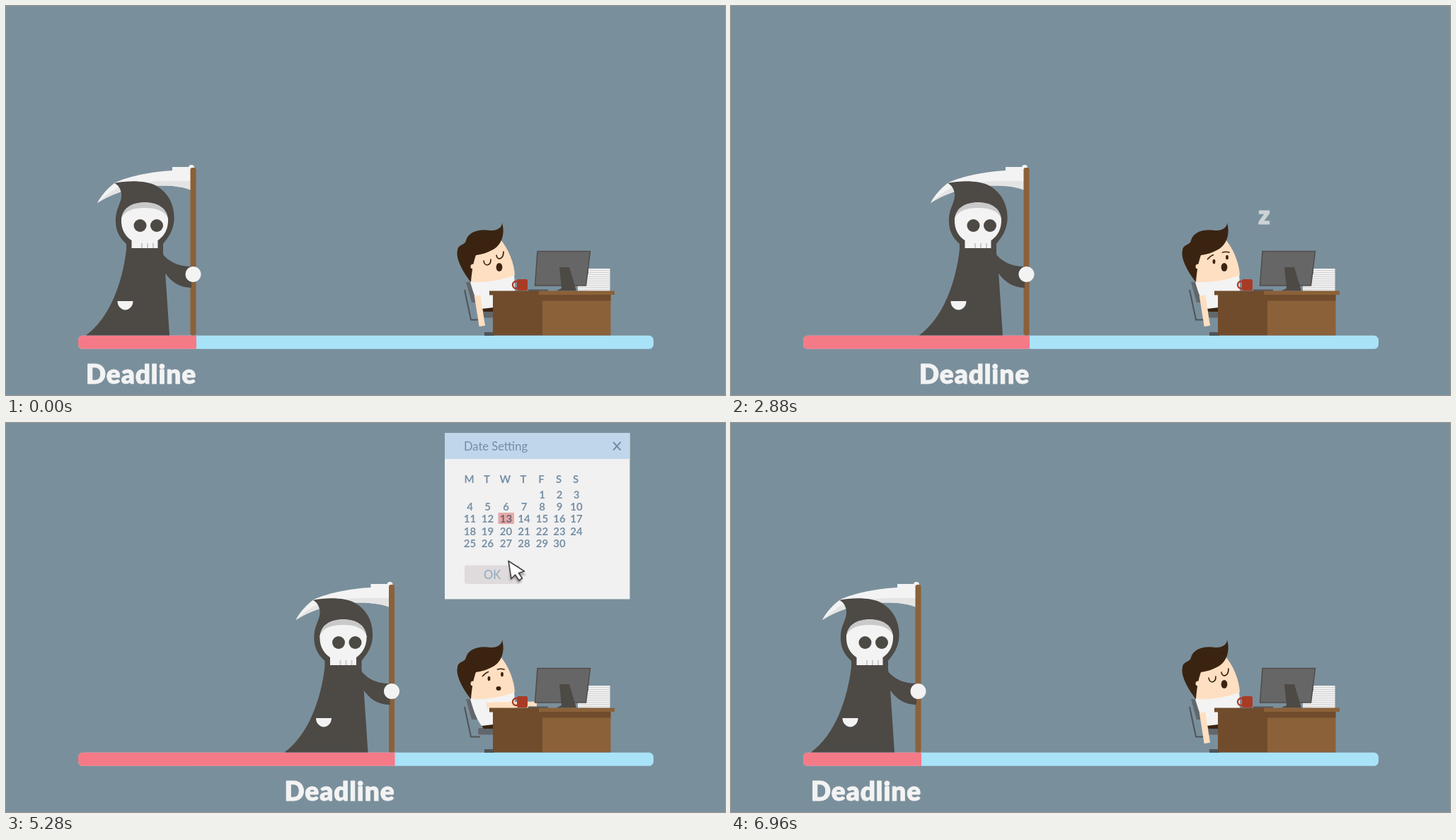
Animation of 1016x551 px, one loop 7 s. Source, as an HTML page:

```html
<!DOCTYPE html>
<html lang="en">
<head>
<meta charset="utf-8">
<title>Deadline</title>
<style>
html, body { margin: 0; width: 100%; height: 100%; overflow: hidden; background: #7a8f9c; }
svg { display: block; width: 100%; height: 100%; }
text { font-family: Lato, sans-serif; text-anchor: middle; }
.dark { fill: #4d4945; }
.bone { fill: #f3f3f3; }
.wood { fill: #8b6139; }
.walnut { fill: #704c2d; }
.skin { fill: #ffdfc1; }
.hair { fill: #3a2411; }
.steel { fill: #62676b; }
.line { fill: none; stroke: #3a2411; stroke-width: 1.7; stroke-linecap: round; }
.title { font-size: 37px; font-weight: 900; letter-spacing: .9px; fill: #f3f3f3; stroke: #f3f3f3; stroke-width: .8; stroke-linejoin: round; }
.z { font-weight: 900; fill: #f3f3f3; stroke: #f3f3f3; stroke-width: 1; stroke-linejoin: round; }
.days { font-size: 15px; font-weight: 700; fill: #7890a4; }
</style>
</head>
<body>
<svg viewBox="0 0 1016 551">
  <defs>
    <clipPath id="track"><rect x="102" y="466.8" width="813" height="19" rx="6.5"/></clipPath>
    <filter id="soft" x="-50%" y="-50%" width="200%" height="200%"><feGaussianBlur stdDeviation="1.6"/></filter>
  </defs>
  <rect width="1016" height="551" fill="#7a8f9c"/>

  <g clip-path="url(#track)">
    <rect x="102" y="466" width="813" height="21" fill="#a8e3f8"/>
    <rect id="fill" x="102" y="466" width="167" height="21" fill="#f57a87"/>
  </g>

  <g id="reaper">
    <path class="bone" d="M262 228H235V233C200 235 168 243 153 251C143 259 134 269 129 279C150 266 165 262 180 258C212 253 243 253 262 261Z"/>
    <path fill="#e4e4e4" d="M129 279C143 266 153 260 163 255C195 248 230 247 262 248V261C243 253 212 253 180 258C165 262 150 266 129 279Z"/>
    <circle class="bone" cx="262" cy="229" r="4"/>
    <rect class="wood" x="260.5" y="229" width="8" height="237.5" rx="3"/>
    <path class="dark" d="M221 351C230 362 243 369 262 369V399C246 399 233 391 224 377Z"/>
    <path class="dark" d="M153 251C173 247 198 247 213 255C232 266 240 287 237 308C234 324 226 331 222 337V349L225 376L231 466.5H113C147 442 165 390 170 345V337C159 327 154 316 155 300C156 285 164 278 163 266C162 258 158 253 153 251Z"/>
    <path fill="#c9c9c9" d="M163 304C163 287 177 278 196 278S229 287 229 304L196 310Z"/>
    <path class="bone" d="M163 301C168 289 182 286 196 286S224 289 229 301C230 318 221 328 214.500 332V343H177.500V332C170 327 162 318 163 301Z"/>
    <path d="M192 343V336M200 343V336M208 343V336" stroke="#c9c9c9" stroke-width="2"/>
    <circle class="dark" cx="189.500" cy="311" r="9"/>
    <circle class="dark" cx="213" cy="311" r="9"/>
    <path class="bone" d="M157.500 418H179.500A11 12.500 0 0 1 157.500 418Z"/>
    <circle class="bone" cx="264.500" cy="380" r="11"/>
    <text class="title" x="191" y="534.500">Deadline</text>
  </g>

  <g id="worker">
    <path d="M648 402L657 444.500H670" fill="none" stroke="#4f5458" stroke-width="2"/>
    <path class="steel" d="M650 391H657L667 420H658Z"/>
    <rect class="steel" x="667" y="432" width="24" height="9.500" rx="3"/>
    <rect x="676" y="462" width="14" height="5" fill="#4f5458"/>
    <path class="hair" d="M671 427H690V433H675Z"/>
    <path class="bone" d="M656 391C680 391 704 387 718 380C719 390 719 398 719 405H690L689 427L672 429C664 418 660 405 656 391Z"/>
    <path class="skin" d="M657 391C654 375 656 357 660 345L699 331C710 344 718 364 719 381C702 388 680 392 657 391Z"/>
    <path class="hair" d="M638 346C639 337 649 339 650 332C653 320 668 315 685 318C696 318 701 313 701 307C706 325 699 338 690 344C680 350 671 352 664 353C660 364 658 378 657 391C645 376 635 357 638 346Z"/>
    <circle class="skin" cx="660" cy="369" r="3.500"/>
    <g id="asleep" class="line">
      <path d="M675 361C676 369 685 369 685 359M693 353C694 361 703 359 703 348"/>
    </g>
    <g id="awake">
      <ellipse class="hair" cx="682.500" cy="362" rx="1.900" ry="3.300"/>
      <ellipse class="hair" cx="701" cy="356" rx="1.900" ry="3.300"/>
      <path class="line" d="M673.500 358.500Q677 354 681.500 352.500M694.500 349Q699 347.500 704 349"/>
    </g>
    <ellipse id="mouth" class="hair"/>
    <line id="arm" stroke="#ffdfc1" stroke-width="8.500"/>
  </g>

  <g id="desk">
    <g id="papers"></g>
    <rect x="738" y="401.500" width="28" height="2.500" fill="#55585a"/>
    <path d="M751 347.500H825.500L819.500 396H747.500Z" fill="#666" stroke="#504d4b" stroke-width="1.500"/>
    <path class="dark" d="M782 370H796L806 403.500H777L785 400Z"/>
    <ellipse cx="720.500" cy="395" rx="4.500" ry="5" fill="none" stroke="#a93b25" stroke-width="2.400"/>
    <rect x="722" y="387" width="15" height="16" rx="2" fill="#a93b25"/>
    <rect class="walnut" x="688" y="408" width="70" height="58.500"/>
    <rect class="wood" x="758" y="408" width="96.500" height="58.500"/>
    <rect class="walnut" x="758" y="409" width="96.500" height="8.500"/>
    <rect class="walnut" x="683" y="403.500" width="72" height="6"/>
    <rect class="wood" x="753" y="403.500" width="107" height="5.500"/>
  </g>

  <text id="smallZ" class="z" x="735" font-size="19">z</text>
  <text id="bigZ" class="z" x="753.5" font-size="36">z</text>

  <g id="calendar">
    <rect x="620" y="14" width="261.500" height="235.500" fill="#f1f1f2"/>
    <rect x="620" y="14" width="261.500" height="37" fill="#c0d6ea"/>
    <text x="692" y="38.500" font-size="16.500" fill="#748da3">Date Setting</text>
    <path d="M858 27L868.500 38.500M868.500 27L858 38.500" stroke="#748da3" stroke-width="1.900"/>
    <rect id="mark" y="127" width="22.500" height="16" fill="#e5aaa7"/>
    <g id="days" class="days"></g>
    <rect x="648" y="201.500" width="78" height="26.500" rx="3" fill="#dfdadb"/>
    <text x="687" y="221" font-size="16.500" fill="#8fa9be">OK</text>
    <g id="cursor">
      <path d="M2 3V28L9 23L14 31L19 29L15 20H25Z" fill="#000" opacity=".35" filter="url(#soft)"/>
      <path d="M0 0L4 25L9.500 19.500L15 27.500L19.500 24.500L14.500 17L22.500 14.500Z" fill="#fff" stroke="#464646" stroke-width="1.700" stroke-linejoin="round"/>
    </g>
  </g>
</svg>
<script>
const LOOP = 7000, STEP = 40, SPEED = 53.12;
const RETURN_START = 6000, RETURN_END = 6960;
const el = Object.fromEntries([...document.querySelectorAll('[id]')].map(node => [node.id, node]));
const set = (node, attrs) => Object.entries(attrs).forEach(([key, value]) => node.setAttribute(key, value));
const add = (parent, tag, attrs, text = '') => {
  const node = document.createElementNS('http://www.w3.org/2000/svg', tag);
  set(node, attrs);
  node.textContent = text;
  parent.append(node);
  return node;
};
const clamp = v => Math.min(1, Math.max(0, v));
const smooth = p => p * p * (3 - 2 * p);
const mix = (a, b, p) => a + (b - a) * p;

// Eased value of a table of [time, ...values] rows
function track(rows, t) {
  const next = rows.findIndex(row => row[0] > t);
  if (next === 0) return rows[0].slice(1);
  if (next < 0) return rows.at(-1).slice(1);
  const a = rows[next - 1], b = rows[next];
  const p = smooth((t - a[0]) / (b[0] - a[0]));
  return a.slice(1).map((v, i) => mix(v, b[i + 1], p));
}

// Shoulder x, y, angle in degrees, length
const ARM_DOWN = [666, 410, 81, 44], ARM_UP = [679, 400, -1, 71];
const ARM = [[3100, ...ARM_DOWN], [3500, ...ARM_UP], [5700, ...ARM_UP], [6020, ...ARM_DOWN]];
const MOUTH_OPEN = [697, 370, 4.4, 6], MOUTH_SMALL = [696, 376, 3.5, 3];
const MOUTH = [[3000, ...MOUTH_OPEN], [3240, ...MOUTH_SMALL], [6520, ...MOUTH_SMALL], [6760, ...MOUTH_OPEN]];
const CURSOR = [[4320, 790, 220], [4800, 704, 136], [4920, 704, 136], [5260, 710, 195.5]];
const CALENDAR = [[3880, 0], [4080, 1], [5780, 1], [5880, 0]];
const SMALL_Z = [[200, 0], [400, 1], [600, 1], [860, 0]];
const BIG_Z = [[450, 0], [650, 1], [820, 1], [980, 0]];

const COLUMNS = [655.5, 680.5, 706.5, 732, 757.5, 782, 806];
const ROWS = [107, 124, 140.5, 158.5, 175.5];
const dates = [];
[...'MTWTFSS'].forEach((name, i) => add(el.days, 'text', { x: COLUMNS[i] - 1, y: 85 }, name));
for (let day = 1; day <= 30; day++) {
  const cell = day + 3;
  dates[day] = add(el.days, 'text', { x: COLUMNS[cell % 7], y: ROWS[Math.floor(cell / 7)] }, day);
}

add(el.papers, 'rect', { x: 808, y: 380, width: 45, height: 23.5, fill: '#f0f0f0' });
add(el.papers, 'rect', { x: 823, y: 372, width: 30.5, height: 31.5, fill: '#f0f0f0' });
for (let y = 374; y < 403; y += 3) {
  const x = y > 380 ? 808 : 823;
  add(el.papers, 'rect', { x, y, width: 853.5 - x, height: 1, fill: '#d3d3d3' });
}

function advance(t) {
  if (t < RETURN_START) return SPEED * t / 1000;
  const p = clamp((t - RETURN_START) / (RETURN_END - RETURN_START));
  return SPEED * RETURN_START / 1000 * (1 - smooth(Math.pow(p, 0.92)));
}

function drawZ(node, rows, t, base) {
  const phase = t % 1000;
  const opacity = t < 3000 ? track(rows, phase)[0] : 0;
  set(node, { opacity, y: base - (phase - 800) * 0.02 });
}

function drawArm(t) {
  const [x1, y1, degrees, length] = track(ARM, t);
  const angle = degrees * Math.PI / 180;
  set(el.arm, { x1, y1, x2: x1 + length * Math.cos(angle), y2: y1 + length * Math.sin(angle) });
}

function render(t) {
  const shift = advance(t);
  set(el.reaper, { transform: `translate(${shift})` });
  set(el.fill, { width: 167 + shift });

  const awake = t >= 2680 && t < 6640;
  set(el.awake, { opacity: +awake });
  set(el.asleep, { opacity: +!awake });
  const [cx, cy, rx, ry] = track(MOUTH, t);
  set(el.mouth, { cx, cy, rx, ry });
  drawArm(t);

  drawZ(el.smallZ, SMALL_Z, t, 326);
  drawZ(el.bigZ, BIG_Z, t, 310.5);

  set(el.calendar, { opacity: track(CALENDAR, t)[0] });
  set(el.cursor, { transform: `translate(${track(CURSOR, t)})` });
  const chosen = t < 4840 ? 15 : 13;
  set(el.mark, { x: chosen === 15 ? 746.5 : 695.5 });
  [13, 15].forEach(day => dates[day].style.fill = day === chosen ? '#735f70' : '');
}

const start = performance.now();
function frame() {
  const t = (performance.now() - start) % LOOP;
  render(Math.floor(t / STEP) * STEP);
  requestAnimationFrame(frame);
}
frame();
</script>
</body>
</html>
```
